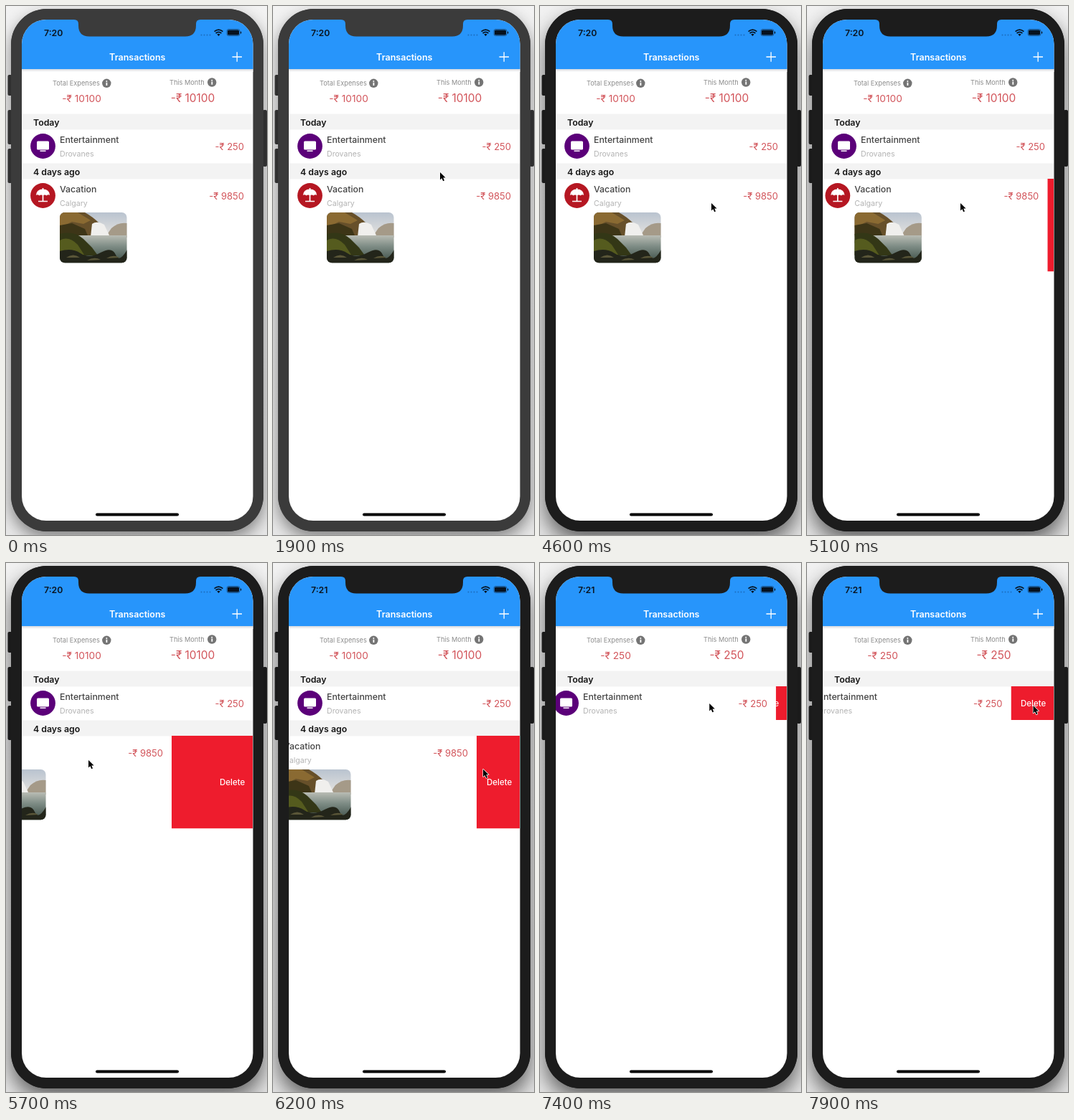
Animation, 364 px wide and 738 px high, one loop 8000 ms. Source, as an HTML page with a canvas:

```html
<!DOCTYPE html>
<html>
<head>
<meta charset="utf-8">
<style>
html, body { margin: 0; width: 100%; height: 100%; overflow: hidden; background: #f1f1f1; }
canvas { display: block; width: 364px; height: 738px; }
</style>
</head>
<body>
<canvas></canvas>
<script>
const LOOP = 8000, FOCUS = 4100, NEW_MINUTE = 6000, DELETED = 6350;
const RED = '#ee1c2d', AMOUNT = '#d2555b';
const canvas = document.querySelector('canvas');
const ctx = canvas.getContext('2d');
const dpr = window.devicePixelRatio || 1;
canvas.width = 364 * dpr;
canvas.height = 738 * dpr;

// Keyframes: [time, value, ...]
const cursorPath = [
  [1000, 262, 740], [1200, 240, 250], [1400, 238, 244], [1800, 233, 232],
  [2400, 233, 232], [3100, 258, 140], [3400, 262, 131], [3700, 260, 133],
  [4000, 268, 281], [4200, 264, 280], [4600, 239, 275], [5000, 239, 275],
  [5350, 115, 275], [5750, 115, 275], [6250, 298, 288], [6700, 298, 288],
  [7200, 262, 196], [7300, 262, 196], [7550, 190, 196], [7650, 190, 196],
  [7900, 315.5, 199]
];
const vacationSwipe = [[5050, 0], [5350, 113], [5750, 113], [6000, 60]];
const leisureSwipe = [[7330, 0], [7550, 61], [7650, 61], [7800, 59.5]];

const ease = u => u * u * (3 - 2 * u);
const clamp = u => Math.max(0, Math.min(1, u));

function track(keys, t) {
  const i = keys.findIndex(k => k[0] > t);
  if (i === 0) return keys[0].slice(1);
  if (i < 0) return keys[keys.length - 1].slice(1);
  const a = keys[i - 1], b = keys[i];
  const u = ease((t - a[0]) / (b[0] - a[0]));
  return a.slice(1).map((v, j) => v + (b[j + 1] - v) * u);
}

function box(x, y, w, h, fill, r = 0) {
  ctx.fillStyle = fill;
  ctx.beginPath();
  ctx.roundRect(x, y, w, h, r);
  ctx.fill();
}

function dot(x, y, r, fill) {
  ctx.fillStyle = fill;
  ctx.beginPath();
  ctx.arc(x, y, r, 0, 7);
  ctx.fill();
}

function shape(path, fill) {
  ctx.fillStyle = fill;
  ctx.fill(new Path2D(path));
}

function line(path, color, width) {
  ctx.strokeStyle = color;
  ctx.lineWidth = width;
  ctx.stroke(new Path2D(path));
}

function text(str, x, y, size, fill, weight = 400, align = 'left') {
  ctx.font = `${weight} ${size}px Inter, sans-serif`;
  ctx.fillStyle = fill;
  ctx.textAlign = align;
  ctx.fillText(str, x, y);
}

function vertical(y0, y1, ...colors) {
  const g = ctx.createLinearGradient(0, y0, 0, y1);
  colors.forEach((c, i) => g.addColorStop(i / (colors.length - 1), c));
  return g;
}

function scoped(draw) {
  ctx.save();
  draw();
  ctx.restore();
}

function clipBox(x, y, w, h, r = 0) {
  ctx.beginPath();
  ctx.roundRect(x, y, w, h, r);
  ctx.clip();
}

function phone(active) {
  const body = active ? '#1c1c1c' : '#3b3b3b';
  const side = active ? '#1a1a1a' : '#303030';
  box(0, 0, 364, 738, vertical(0, 738, '#f3f3f3', '#e9e9e9'));
  scoped(() => {
    ctx.shadowColor = `rgba(0,0,0,${active ? .6 : .45})`;
    ctx.shadowBlur = (active ? 30 : 22) * dpr;
    ctx.shadowOffsetY = (active ? 14 : 9) * dpr;
    box(7, 4, 352, 729, body, 50);
  });
  box(2.5, 96, 6, 29, side, 2);
  box(2.5, 145, 6, 48, side, 2);
  box(2.5, 199, 6, 48, side, 2);
  box(358, 145, 6, 79, side, 2);
  box(7, 4, 352, 729, body, 50);
  return body;
}

function statusBar(t, body) {
  shape('M95 18V19Q101 19 101 25V27Q101 42.5 116 42.5H250Q265 42.5 265 27V25Q265 19 271 19V18Z', body);
  text(t < NEW_MINUTE ? '7:20' : '7:21', 53, 42, 12.3, '#0a1420', 600);
  for (let i = 0; i < 4; i++) dot(272.5 + i * 4, 40.5, 1, 'rgba(10,50,100,.4)');
  const ink = '#06121f';
  shape('M296.5 42L294.3 39.6Q296.5 37.8 298.7 39.6Z', ink);
  line('M292.6 38Q296.5 34.6 300.4 38M290.6 35.7Q296.5 30.6 302.4 35.7', ink, 1.7);
  line('M310 32.5H323.5Q326 32.5 326 35V39Q326 41.5 323.5 41.5H310.5Q308 41.5 308 39V35Q308 32.5 310.5 32.5', '#1a4a78', .8);
  box(309, 33.5, 16, 7, ink, 1.5);
  box(327, 35.5, 1.2, 3, ink, .6);
}

function total(label, x, y, iconX, iconY, amount, center, base, size) {
  text(label, x, y, 9.2, '#8c8c8c');
  dot(iconX, iconY, 6.2, '#747474');
  box(iconX - .8, iconY - 1, 1.8, 4.2, '#fff');
  dot(iconX, iconY - 2.8, 1, '#fff');
  text(amount, center, base, size, AMOUNT, 400, 'center');
}

function sectionTitle(label, y) {
  box(22, y, 322, 22, '#f3f3f3');
  text(label, 38, y + 16, 12.3, '#161616', 600);
}

function row(y, color, title, note, amount) {
  dot(51.5, y + 23.5, 17.4, color);
  text(title, 75, y + 18.5, 12.3, '#444', 500);
  text(note, 75, y + 38.3, 10.6, '#b3b3b3');
  text(amount, 332, y + 28.5, 13, AMOUNT, 400, 'right');
}

function deleteButton(y, h, width) {
  if (width < .1) return;
  scoped(() => {
    clipBox(344 - width, y, width, h);
    box(344 - width, y, width, h, RED);
    text('Delete', 298, y + h / 2 + 4.2, 11.5, '#fff', 500);
  });
}

function photo() {
  scoped(() => {
    clipBox(75, 288, 93.5, 70.3, 7);
    box(75, 288, 94, 71, vertical(288, 322, '#b9c3cf', '#e6e4e0'));
    shape('M169 303Q157 301 147 310L138 323H169Z', '#a59a88');
    shape('M75 288H110Q121 294 130 303L139 322H75Z', '#67502a');
    shape('M75 288H100L118 299L108 304L92 301L75 309Z', '#8a6a32');
    shape('M75 306L92 303L110 311L116 325L75 331Z', '#3d3517');
    shape('M120 304Q127 299 137 305L145 322Q130 325 118 322Z', '#f0efed');
    box(75, 320, 94, 39, vertical(320, 350, '#b9bcb4', '#7f8d86', '#53635c'));
    shape('M75 318Q95 313 108 325L120 337L128 348H75Z', '#333716');
    shape('M75 327Q87 320 100 333L109 347H75Z', '#555b1e');
    shape('M75 342Q92 337 104 345T132 344T153 347T169 340V359H75Z', '#23251a');
    shape('M84 351Q94 344 103 351ZM140 352Q150 346 158 351ZM113 355Q123 349 132 354Z', '#5a5638');
  });
}

function vacation(t) {
  const gone = ease(clamp((t - DELETED) / 330));
  if (gone === 1) return;
  const width = track(vacationSwipe, t)[0] * (1 - gone);
  scoped(() => {
    ctx.globalAlpha = (1 - gone) ** 3;
    sectionTitle('4 days ago', 219.5);
  });
  scoped(() => {
    ctx.globalAlpha = (1 - gone) ** 1.4;
    ctx.translate(-width, -24 * gone);
    row(241, '#b51722', 'Vacation', 'Calgary', '-₹ 9850');
    shape('M41.8 264Q42.5 255.500 51.5 255.500T61.200 264Q59 262.500 56.500 264.500Q54 262.500 51.500 264.500Q49 262.500 46.500 264.500Q44 262.500 41.800 264Z', '#fff');
    line('M51.5 254V272M45 272.500H58', '#fff', 1.7);
    photo();
  });
  deleteButton(241, 129.5, width);
}

function leisure(t) {
  const width = track(leisureSwipe, t)[0];
  scoped(() => {
    ctx.translate(-width, 0);
    row(172, '#5b0079', 'Entertainment', 'Drovanes', '-₹ 250');
    box(43, 188.5, 17, 12, '#fff', 1.5);
    box(47.5, 201.5, 8, 1.6, '#fff');
  });
  deleteButton(172, 47, width);
}

function cursor(t) {
  if (t < 1000) return;
  scoped(() => {
    ctx.translate(...track(cursorPath, t));
    const arrow = 'M0 0V10.5L2.400 8.300L4.200 12.300L6 11.500L4.300 7.600H7.600Z';
    ctx.lineJoin = 'round';
    line(arrow, '#fff', 1.4);
    shape(arrow, '#000');
  });
}

function draw(t) {
  ctx.setTransform(dpr, 0, 0, dpr, 0, 0);
  const body = phone(t >= FOCUS);
  const sum = t < DELETED + 50 ? '-₹ 10100' : '-₹ 250';
  scoped(() => {
    clipBox(22, 19, 322.5, 699, 34);
    box(22, 19, 323, 700, '#fff');
    box(22, 88, 323, 4, vertical(88, 92, '#d5d9de', '#fff'));
    box(22, 19, 323, 69, '#2795fb');
    statusBar(t, body);
    text('Transactions', 183.3, 75.5, 12.5, '#fff', 600, 'center');
    line('M315.5 71H329M322.2 64.200V77.800', '#fff', 1.3);
    total('Total Expenses', 65, 111.2, 140.3, 107.8, sum, 105.5, 134, 13.7);
    total('This Month', 228, 110.2, 287.2, 106.5, sum, 260.5, 134, 15.4);
    sectionTitle('Today', 150.5);
    leisure(t);
    vacation(t);
    box(125, 707.5, 116, 4, '#000', 2);
  });
  cursor(t);
}

function frame() {
  draw(performance.now() % LOOP);
  requestAnimationFrame(frame);
}
frame();
</script>
</body>
</html>
```
